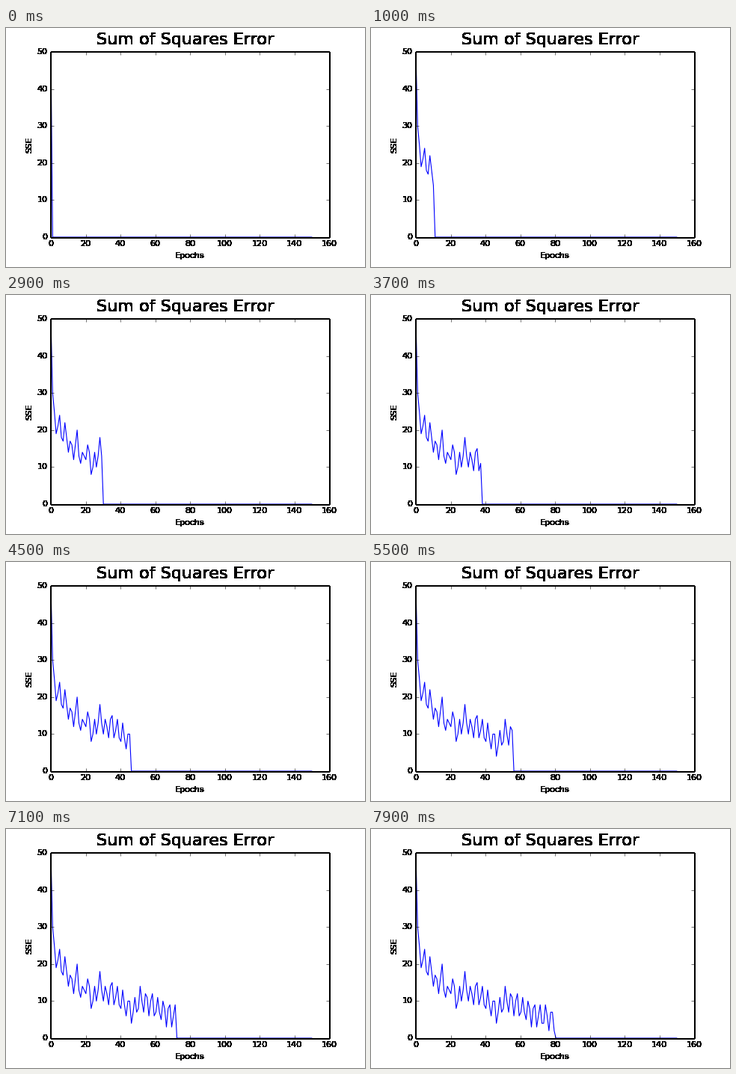
Write a matplotlib script that moves like this. It is 480 px wide and 320 px high and loops after 8 s.

```python
import numpy as np
import matplotlib.pyplot as plt
from matplotlib.animation import FuncAnimation

plt.style.use("classic")
plt.rcParams.update({
    "figure.figsize": (6, 4),
    "figure.dpi": 80,
    "savefig.dpi": 80,
    "figure.facecolor": "white",
    "figure.subplot.bottom": 0.125,
    "font.family": "DejaVu Sans",
    "font.size": 10,
})

EPOCHS = 150
FRAMES = 80

# Broad course of the error: (epoch, level)
TREND = [(0, 52), (1, 29), (2, 23), (9, 18), (12, 14), (15, 17), (18, 11),
         (20, 15), (24, 9.5), (28, 15), (31, 11), (34, 13), (47, 7),
         (51, 10.5), (67, 6.5), (79, 5)]


def error(epoch):
    """Whole-number error: falling trend plus a steady ripple."""
    ripple = 3.3 * np.cos(2 * np.pi * (epoch - 28) / 3.3)
    return np.round(np.interp(epoch, *zip(*TREND)) + ripple)


def solid(img, dpi):
    """Make every touched pixel opaque, for heavy, hard-edged ink."""
    img = img.copy()
    img[..., 3] = np.ceil(img[..., 3])
    return img, 0, 0


fig, ax = plt.subplots()
ax.set_xlim(0, 160)
ax.set_ylim(0, 50)
ax.set_xticks(range(0, 161, 20))
ax.set_yticks(range(0, 51, 10))

labels = [
    fig.suptitle("Sum of Squares Error", fontsize=20),
    ax.set_xlabel("Epochs"),
    ax.set_ylabel("SSE"),
]
for text in labels + ax.get_xticklabels() + ax.get_yticklabels():
    text.set_agg_filter(solid)

# Hard outer rim of the frame, tucked under the white plot area
rim = plt.Rectangle((0.125, 0.125), 0.775, 0.775, fill=False, lw=1,
                    transform=fig.transFigure, zorder=-1)
rim.set_agg_filter(solid)
fig.add_artist(rim)

index = np.arange(EPOCHS)
errors = error(index)
line, = ax.plot(np.linspace(0, EPOCHS, EPOCHS), np.zeros(EPOCHS), "b-", lw=1)


def update(i):
    line.set_ydata(np.where(index <= i, errors, 0))
    return line,


anim = FuncAnimation(fig, update, frames=FRAMES, interval=100,
                     repeat=True, repeat_delay=0)
plt.show()
```
